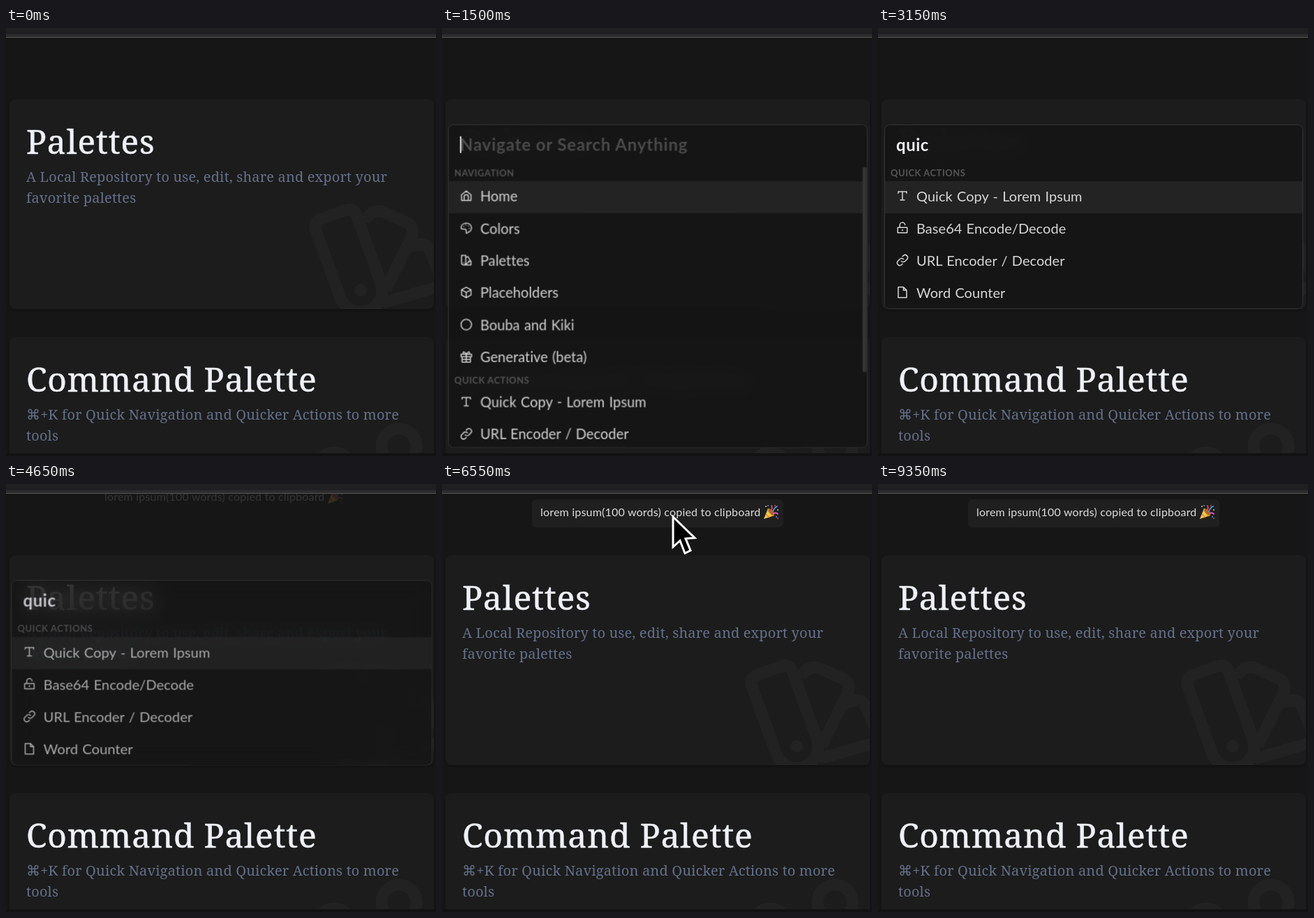
These frames come from a looping animation (616 px wide and 612 px high, 9950 ms). An HTML page:

```html
<!DOCTYPE html>
<html lang="en">
<head>
<meta charset="utf-8">
<title>Command palette</title>
<style>
html, body { margin: 0; width: 100%; height: 100%; overflow: hidden; background: #161616; }
body { position: relative; font-family: Lato, sans-serif; }
svg { display: block; }
.stage { position: absolute; left: 0; top: 0; width: 616px; height: 612px; overflow: hidden; }

/* one shared loop for every moving part */
.anim { animation: 9.95s linear infinite; }
.step { animation: 9.95s step-end infinite; }

.title { font: 48px "Noto Serif", serif; letter-spacing: .85px; fill: #eff1f8; stroke: #eff1f8; stroke-width: .5; }
.sub { font: 20px "Noto Serif", "DejaVu Sans", serif; letter-spacing: .15px; fill: #64708a; }
.mark { fill: none; stroke: #222223; stroke-width: 17; stroke-linejoin: round; }

.toast { animation-name: toast; opacity: 0; }
.toast text { font: 16px Lato, sans-serif; letter-spacing: .2px; fill: #dcdcdc; }

.panel {
  position: absolute; left: 9px; top: 138px; width: 600px; height: 462px;
  box-sizing: border-box; border: 1px solid #343434; border-radius: 8px; overflow: hidden;
  background: rgba(20, 20, 20, .5); backdrop-filter: blur(13px);
  opacity: 0; animation-name: panel, height;
  animation-duration: 9.95s; animation-iteration-count: infinite;
}
.view {
  position: absolute; left: 0; top: 0; width: 598px; box-sizing: border-box;
  padding-top: 60px; background: rgba(22, 22, 22, .93); overflow: hidden;
}
.all { height: 460px; animation-name: hide; }
.found { height: 262px; opacity: 0; animation-name: show; }
.sec {
  height: 18px; padding-left: 8px; font: bold 13px/16px Lato, sans-serif;
  letter-spacing: .5px; color: #555;
}
.top { margin-bottom: 2px; }
.row {
  display: flex; align-items: center; box-sizing: border-box; height: 46px; padding: 0 0 4px 16px;
  font-size: 20px; letter-spacing: .05px; word-spacing: 1px; color: #d6d6d6; white-space: pre;
}
.on { background: #232323; }
.row svg {
  width: 18px; height: 18px; margin-right: 11px; flex: none; fill: none;
  stroke: #d6d6d6; stroke-width: 2; stroke-linecap: round; stroke-linejoin: round;
}
.bar { position: absolute; left: 592px; top: 60px; width: 6px; height: 293px; border-radius: 3px; background: #353535; }
.hint, .query { position: absolute; left: 16px; top: 11.5px; font: bold 24px/32px Lato, sans-serif; white-space: pre; }
.hint { letter-spacing: .85px; color: #4c4c4c; animation-name: hide; }
.query { display: flex; align-items: center; letter-spacing: .5px; color: #ededf2; }
.query b { max-width: 0; overflow: hidden; }
.query i { width: 1.5px; height: 24px; background: #d8d8d8; animation-name: caret; }

.cursor { position: absolute; left: 0; top: 0; width: 1px; height: 1px; overflow: visible; animation-name: move; }
.seen { opacity: 0; animation-name: seen; }
.arrow { opacity: 0; animation-name: arrow; }
.hand { animation-name: hand; }
.grow { animation-name: grow; transform: scale(.36); }

@keyframes panel {
  0%, 13.37% { opacity: 0; transform: scale(.99); }
  14.07% { opacity: 1; transform: scale(1.01); animation-timing-function: ease-out; }
  15.48%, 46.1% { opacity: 1; transform: none; }
  46.6% { opacity: 1; transform: scale(1.01); animation-timing-function: linear; }
  47.24%, 100% { opacity: 0; transform: scale(.99); }
}
@keyframes height {
  0%, 23.47% { height: 462px; animation-timing-function: ease-out; }
  24.47%, 100% { height: 264px; }
}
@keyframes hide { 0% { opacity: 1; } 23.5%, 100% { opacity: 0; } }
@keyframes show { 0% { opacity: 0; } 23.5%, 100% { opacity: 1; } }
@keyframes key1 { 23.5%, 100% { max-width: 30px; } }
@keyframes key2 { 24.5%, 100% { max-width: 30px; } }
@keyframes key3 { 26.1%, 100% { max-width: 30px; } }
@keyframes key4 { 26.6%, 100% { max-width: 30px; } }
@keyframes caret {
  0%, 23.5%, 36.63% { opacity: 1; }
  18.55%, 31.6%, 41.66%, 100% { opacity: 0; }
}
@keyframes toast {
  0%, 46.13% { opacity: 0; transform: translateY(-26px); animation-timing-function: ease; }
  50.75%, 100% { opacity: 1; transform: none; }
}
@keyframes move {
  0%, 55.73% { transform: translate(454px, 304px); }
  56.28% { transform: translate(438px, 268px); }
  57.79% { transform: translate(376px, 150px); }
  58.79% { transform: translate(312px, 62px); }
  59.8% { transform: translate(384px, 50px); }
  60.8% { transform: translate(298px, 56px); }
  61.81% { transform: translate(372px, 46px); }
  62.81% { transform: translate(304px, 50px); }
  63.82% { transform: translate(346px, 46px); }
  65.33%, 65.93% { transform: translate(331px, 47px); }
  67.34% { transform: translate(296px, 50px); }
  68.84%, 85.88% { transform: translate(352px, 76px); }
  85.93%, 90.45% { transform: translate(353px, 77px); animation-timing-function: ease-in; }
  93.77%, 100% { transform: translate(620px, 84px); }
}
@keyframes grow {
  0%, 60.8% { transform: scale(.36); }
  63.82%, 65.93% { transform: none; }
  68.84%, 100% { transform: scale(.36); }
}
@keyframes seen { 0% { opacity: 0; } 55.75% { opacity: 1; } 93.77%, 100% { opacity: 0; } }
@keyframes hand { 0% { opacity: 1; } 58.3%, 100% { opacity: 0; } }
@keyframes arrow { 0% { opacity: 0; } 58.3%, 100% { opacity: 1; } }
</style>
</head>
<body>
<div class="stage">
<svg width="616" height="612">
  <defs>
    <clipPath id="card"><rect x="5" y="102" width="608" height="300" rx="8"/></clipPath>
    <filter id="shade" x="-5%" y="-5%" width="110%" height="112%">
      <feDropShadow dx="0" dy="2" stdDeviation="2" flood-color="#000" flood-opacity=".3"/>
    </filter>
    <symbol id="home" viewBox="0 0 24 24"><path d="M3 10l9-7 9 7v11H3zM8 21v-7a4 4 0 0 1 8 0v7"/></symbol>
    <symbol id="colors" viewBox="0 0 24 24"><path d="M12 22v-4q0-4-4-4H5Q2 14 2 11A10 9 0 1 1 16 20q-2 2-4 2zM7 9h.1M11 6h.1M16 8h.1M18 13h.1"/></symbol>
    <symbol id="swatch" viewBox="0 0 24 24"><path d="M3 3h8v14a4 4 0 0 1-8 0zM11 7l4-2 5 8-9 7M16 14h5v7H7M7 17h.1"/></symbol>
    <symbol id="box" viewBox="0 0 24 24"><path d="M12 2l9 5v10l-9 5-9-5V7zM3 7l9 5 9-5M12 12v10"/></symbol>
    <symbol id="ring" viewBox="0 0 24 24"><circle cx="12" cy="12" r="10"/></symbol>
    <symbol id="gift" viewBox="0 0 24 24"><path d="M2 7h20v5H2zM4 12v10h16V12M12 7v15M12 7Q5 8 6 4t6 3q5-7 6-3t-6 3M4 17h16"/></symbol>
    <symbol id="type" viewBox="0 0 24 24"><path d="M4 7V4h16v3M12 4v16M8 20h8"/></symbol>
    <symbol id="link" viewBox="0 0 24 24"><path d="M10 14a5 5 0 0 0 7 0l4-4a5 5 0 0 0-7-7l-2 2M14 10a5 5 0 0 0-7 0l-4 4a5 5 0 0 0 7 7l2-2"/></symbol>
    <symbol id="lock" viewBox="0 0 24 24"><path d="M3 11h18v10H3zM7 11V7a5 5 0 0 1 10-1M12 15v2"/></symbol>
    <symbol id="file" viewBox="0 0 24 24"><path d="M14 2H4v20h16V8zM14 2v6h6"/></symbol>
  </defs>

  <g fill="#1b1b1b" filter="url(#shade)">
    <rect x="5" y="102" width="608" height="300" rx="8"/>
    <rect x="5" y="442" width="608" height="300" rx="8"/>
  </g>
  <g clip-path="url(#card)" class="mark">
    <path d="M578 313l14-4q11-1 15 9l23 52M540 393l80-23"/>
    <path d="M514 277q7-18 26-14l34 15q12 7 7 22l-37 74"/>
    <path transform="translate(508 375) rotate(-20)" d="M-31 0v-102q0-13 13-13h36q13 0 13 13V0a31 31 0 0 1-62 0z"/>
    <circle cx="508" cy="375" r="9" fill="#222223" stroke="none"/>
  </g>
  <g class="mark">
    <circle cx="563" cy="598" r="25"/>
    <circle cx="470" cy="632" r="25"/>
  </g>

  <text class="title" x="29" y="180">Palettes</text>
  <g class="sub">
    <text x="29" y="220">A Local Repository to use, edit, share and export your</text>
    <text x="29" y="250">favorite palettes</text>
    <text x="29" y="560">⌘+K for Quick Navigation and Quicker Actions to more</text>
    <text x="29" y="590">tools</text>
  </g>
  <text class="title" x="29" y="520">Command Palette</text>
  <rect y="608" width="616" height="4" fill="#121212"/>

  <g class="anim toast">
    <rect x="129" y="22" width="360" height="40" rx="6" fill="#1f1f1f"/>
    <text x="141" y="46">lorem ipsum(100 words) copied to clipboard</text>
    <path d="M461 50l6-15q8 2 9 10z" fill="#f6c544"/>
    <path d="M464 43l5 5M466 37l8 9" stroke="#d98a2b" stroke-width="1.6"/>
    <ellipse cx="472" cy="40" rx="2.5" ry="6" transform="rotate(-42 472 40)" fill="#a8642a"/>
    <g fill="none" stroke-width="1.8" stroke-linecap="round">
      <path d="M471 38q3-3 1-7" stroke="#e5484d"/>
      <path d="M474 39q2-5 6-7" stroke="#4a9df0"/>
      <path d="M475 42q4-2 6 1" stroke="#d65bd0"/>
      <path d="M464 32h.1M481 37h.1" stroke="#f4d03f"/>
      <path d="M467 31h.1M479 47h.1" stroke="#4a9df0"/>
      <path d="M477 31h.1M481 49h.1" stroke="#e5484d"/>
    </g>
  </g>

  <rect width="616" height="9" fill="#202022"/>
  <rect y="9" width="616" height="4" fill="#2d2d2e"/>
  <rect y="13" width="616" height="1" fill="#555"/>
</svg>

<div class="panel">
  <div class="view all step">
    <div class="sec top">NAVIGATION</div>
    <div class="row on"><svg><use href="#home"/></svg>Home</div>
    <div class="row"><svg><use href="#colors"/></svg>Colors</div>
    <div class="row"><svg><use href="#swatch"/></svg>Palettes</div>
    <div class="row"><svg><use href="#box"/></svg>Placeholders</div>
    <div class="row"><svg><use href="#ring"/></svg>Bouba and Kiki</div>
    <div class="row"><svg><use href="#gift"/></svg>Generative (beta)</div>
    <div class="sec">QUICK ACTIONS</div>
    <div class="row"><svg><use href="#type"/></svg>Quick Copy - Lorem Ipsum</div>
    <div class="row"><svg><use href="#link"/></svg>URL Encoder / Decoder</div>
    <div class="bar"></div>
  </div>
  <div class="view found step">
    <div class="sec top">QUICK ACTIONS</div>
    <div class="row on"><svg><use href="#type"/></svg>Quick Copy - Lorem Ipsum</div>
    <div class="row"><svg><use href="#lock"/></svg>Base64 Encode/Decode</div>
    <div class="row"><svg><use href="#link"/></svg>URL Encoder / Decoder</div>
    <div class="row"><svg><use href="#file"/></svg>Word Counter</div>
  </div>
  <div class="hint step">Navigate or Search Anything</div>
  <div class="query">
    <b class="step" style="animation-name: key1">q</b>
    <b class="step" style="animation-name: key2">u</b>
    <b class="step" style="animation-name: key3">i</b>
    <b class="step" style="animation-name: key4">c</b>
    <i class="step"></i>
  </div>
</div>

<svg class="cursor anim">
  <g class="seen step">
    <g class="arrow step">
      <path class="grow anim" d="M0 0v43l10-9 7 18 8-4-7-17 13-1z" fill="#000" stroke="#fff" stroke-width="3"/>
    </g>
    <path class="hand step" d="M3 1.5q2-1 2.6 1L7 7q1.5-1 2.4.4Q11 6.500 11.600 8q1.500-.4 1.900 1.200l.3 4.300-1.300 3.800H6L3.500 13 .8 10.400q.2-1.700 2-.9l1.200 1L2 3.500q-.2-1.500 1-2z" fill="#fff" stroke="#111" stroke-width=".9"/>
  </g>
</svg>
</div>
</body>
</html>
```
